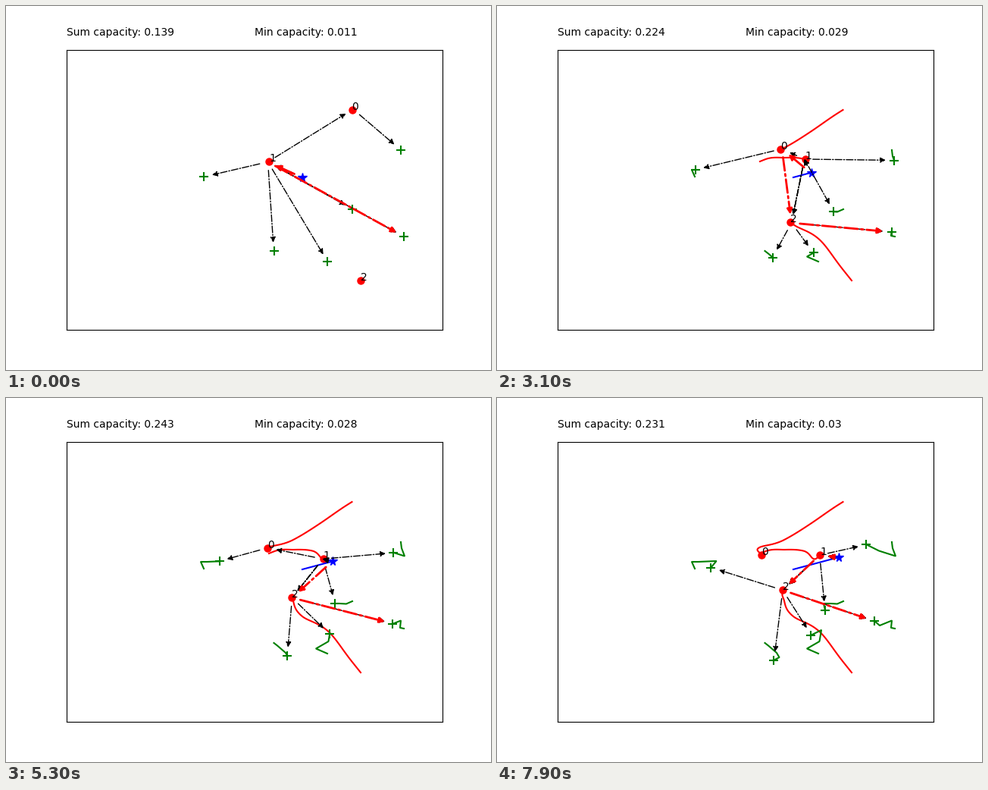
Recreate the animation shown at these times as a matplotlib script. Size 640 by 480 pixels, loop 8 s.

```python
import numpy as np
import matplotlib.pyplot as plt
from matplotlib.animation import FuncAnimation

FRAMES, STEP = 80, 100
T = np.arange(FRAMES)


def walk(*points):
    """Straight legs of equal duration."""
    t = np.linspace(0, T[-1], len(points))
    return np.c_[tuple(np.interp(T, t, p) for p in zip(*points))]


def glide(*points):
    """Smooth path that slows down: keys lie ever further apart in time."""
    t = T[-1] * np.linspace(0, 1, len(points)) ** 2
    i = np.clip(np.searchsorted(t, T, "right") - 1, 0, len(t) - 2)
    h = (t[i + 1] - t[i])[:, None]
    u = (T - t[i])[:, None] / h
    p = np.array(points, float)
    m = np.gradient(p, t, axis=0)
    return ((1 + 2 * u) * (1 - u) ** 2 * p[i] + u * (1 - u) ** 2 * h * m[i]
            + u * u * (3 - 2 * u) * p[i + 1] + u * u * (u - 1) * h * m[i + 1])


# Relays 0-2, users A-F, base station S
paths = {
    "0": glide((456.5, 137), (447, 143), (415, 165), (379, 187), (346.5, 197), (349, 207)),
    "1": glide((347, 205), (356, 201.5), (380.5, 200), (404, 201.5), (417.5, 212), (426, 207)),
    "2": glide((468, 362), (456, 347), (429, 311.5), (391, 288), (378, 264.5), (377, 253)),
    "A": walk((261, 225), (257, 216), (265.5, 216), (289.5, 215), (282, 224)),
    "B": walk((521, 190), (522, 198), (526, 208.5), (504, 201.5), (487, 193)),
    "C": walk((353.5, 323), (358, 326.5), (369, 336), (372.5, 342), (365, 346)),
    "D": walk((424, 337), (409, 330.5), (425.5, 321), (428, 306), (414, 313)),
    "E": walk((457, 268), (449, 271.5), (440, 271), (431, 271), (433, 280)),
    "F": walk((525, 304), (520, 303), (521, 293.5), (505, 300), (498, 294)),
    "S": walk((391, 226), (451, 210)),
}

# First step, route to each user, weakest route
MESH = "S10A S1B S12C S12D S1E S12F"
PHASES = [
    (0, "S1A S10B S1C S1D S1E S1F", "S1F"),
    (6, "S1A S10B S12C S12D S1E S12F", "S12F"),
    (18, MESH, "S0A"),
    (31, MESH, "S02F"),
    (45, MESH, "S2F"),
    (60, MESH, "S12F"),
    (74, MESH.replace("10A", "12A"), "S12F"),
]

times = [0, 12, 24, 38, 53, 68, 79]
total = np.interp(T, times, [.139, .177, .21, .238, .243, .235, .231])
lowest = np.interp(T, times, [.011, .022, .03, .028, .028, .029, .03])

fig, ax = plt.subplots(figsize=(6.4, 4.8), dpi=100)


def linked(name, f):
    """Links follow the positions of the step before."""
    p = paths[name]
    return p[f - 1] if f else 1.5 * p[0] - 0.5 * p[1]


def draw_route(route, f, color, lw):
    for a, b in zip(route, route[1:]):
        ax.annotate("", xy=linked(b, f), xytext=linked(a, f),
                    arrowprops=dict(arrowstyle="-|>", shrinkA=8, shrinkB=8,
                                    color=color, lw=lw, ls="-."))


def draw(f):
    ax.clear()
    ax.set(xlim=(80, 576), ylim=(427.2, 57.6), xticks=[], yticks=[])
    for name, p in paths.items():
        x, y = p[f]
        if name == "S":
            color, mark = "blue", dict(marker="*", ms=8.5)
        elif name.isdigit():
            color, mark = "red", dict(marker="o", ms=6, mew=1.5)
            ax.text(x, y, name)
        else:
            color, mark = "green", dict(marker="+", ms=8.5, mew=1.5)
        ax.plot(*p[:f + 1].T, color=color, lw=1.5)
        ax.plot(x, y, color=color, **mark)

    _, routes, weakest = [p for p in PHASES if p[0] <= f][-1]
    for route in routes.split():
        draw_route(route, f, "black", 1)
    draw_route(weakest, f, "red", 2)

    for x, label, value in ((0, "Sum", total[f]), (0.5, "Min", lowest[f])):
        ax.text(x, 1.05, f"{label} capacity: {round(float(value), 3)}",
                transform=ax.transAxes)


anim = FuncAnimation(fig, draw, frames=FRAMES, interval=STEP, repeat=True,
                     repeat_delay=0, init_func=lambda: None)
plt.show()
```
